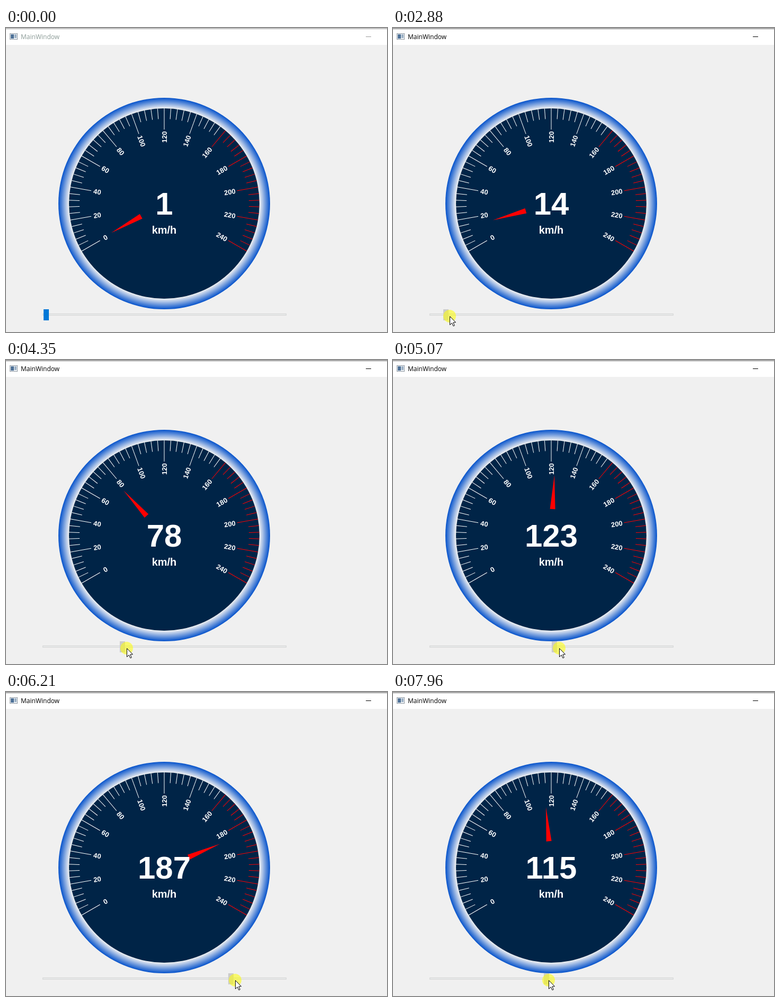
Animation of 720 by 575 pixels, one loop 8 s. Source, as an HTML page with a canvas:

```html
<!DOCTYPE html>
<html lang="en">
<head>
<meta charset="utf-8">
<title>Speedometer</title>
<style>
  html, body { margin: 0; width: 100%; height: 100%; overflow: hidden; background: #f0f0f0; }
  canvas { display: block; }
</style>
</head>
<body>
<canvas id="stage" width="720" height="575"></canvas>
<script>
const ctx = document.getElementById('stage').getContext('2d');
const LOOP = 8000;
const ENTER = 120, HOVER = 960, PRESS = 1710;
const CX = 299, CY = 332, MAX = 240;
const TRACK = { x: 69, y: 540, w: 460, handle: 10 };
const SANS = '"Liberation Sans", Arial, sans-serif';

// Turning points of the drag: time, speed
const DRAG = [
  [2300, 1], [2880, 14], [3660, 41], [4740, 99], [5580, 161],
  [6210, 187], [6660, 213], [6820, 213], [7120, 188], [7960, 115]
];

const clamp = (v, lo, hi) => Math.min(hi, Math.max(lo, v));
const dialAngle = v => (150 + v) * Math.PI / 180;
const handleX = v => TRACK.x + v / MAX * (TRACK.w - TRACK.handle);

function speedAt(t) {
  const time = clamp(t, DRAG[0][0], DRAG[DRAG.length - 1][0]);
  const i = DRAG.findIndex((k, n) => n > 0 && time <= k[0]);
  const [t0, v0] = DRAG[i - 1], [t1, v1] = DRAG[i];
  return v0 + (v1 - v0) * (time - t0) / (t1 - t0);
}

// Glides in on an arc, then holds the handle, slightly ahead of it.
function pointerAt(t) {
  const p = clamp((t - ENTER) / (HOVER - ENTER), 0, 1), rest = 1 - p;
  const grip = handleX(speedAt(t + 35)) + TRACK.handle / 2 + 4;
  return {
    x: Math.round(grip + 395 * rest * rest),
    y: Math.round(545 + 14 * rest - 27 * Math.sin(Math.PI * p))
  };
}

function rect(color, x, y, w, h) {
  ctx.fillStyle = color;
  ctx.fillRect(x, y, w, h);
}

function disc(fill, x, y, r) {
  ctx.fillStyle = fill;
  ctx.beginPath();
  ctx.arc(x, y, r, 0, 7);
  ctx.fill();
}

function polygon(points, fill) {
  ctx.beginPath();
  points.forEach(([x, y]) => ctx.lineTo(x, y));
  ctx.closePath();
  ctx.fillStyle = fill;
  ctx.fill();
}

function text(str, x, y, font, color, align = 'center') {
  ctx.font = font;
  ctx.fillStyle = color;
  ctx.textAlign = align;
  ctx.fillText(str, x, y);
}

// Runs paint with x pointing outwards along the dial at speed v.
function onDial(v, paint) {
  ctx.save();
  ctx.translate(CX, CY);
  ctx.rotate(dialAngle(v));
  paint();
  ctx.restore();
}

function titleBar(active) {
  rect('#fff', 0, 0, 720, 32);
  rect('#ececec', 0, 0, 720, 1);
  rect(active ? '#5c5c5c' : '#969696', 0, 1, 720, 1);
  rect('#8b949e', 7, 10, 15, 12);
  rect('#f4f7fa', 8, 11, 13, 10);
  rect('#4d7096', 9, 12, 6, 8);
  rect('#9bb0c4', 16, 12, 4, 7);
  text('MainWindow', 28, 21, '12px "Open Sans", sans-serif', active ? '#000' : '#8b9a96', 'left');
  rect(active ? '#000' : '#999', 680, 16, 10, 1);
}

function tick(v, length) {
  onDial(v, () => rect(v >= 160 ? '#f00' : '#fff', 180 - length, -0.5, length, 1));
}

function label(v) {
  onDial(v, () => {
    ctx.translate(v < 100 ? 128.5 : 125.8, 0);
    if (v < 120) ctx.rotate(Math.PI);
    text(v, 0, 4.6, 'bold 13px ' + SANS, '#fff');
  });
}

function gauge(speed) {
  const rim = ctx.createRadialGradient(CX, CY, 180, CX, CY, 200);
  rim.addColorStop(0, '#f2f2f2');
  rim.addColorStop(1, '#0552cb');
  disc(rim, CX, CY, 200);
  disc('#002447', CX, CY, 180);
  for (let v = 0; v <= MAX; v += 4) {
    const major = v % 20 === 0;
    tick(v, major ? 40 : 20);
    if (major) label(v);
  }
  onDial(speed, () => polygon([[50, -5], [50, 5], [114.5, 0]], '#f00'));
  text(speed, CX, 353, 'bold 60px ' + SANS, '#fff');
  text('km/h', CX, 389, 'bold 20px ' + SANS, '#fff');
}

function slider(speed, color) {
  rect('#d6d6d6', TRACK.x, TRACK.y, TRACK.w + 1, 4);
  rect('#e7eaea', TRACK.x + 1, TRACK.y + 1, TRACK.w - 1, 2);
  rect(color, Math.round(handleX(speed)), 532, TRACK.handle, 21);
}

function pointer({ x, y }, pressed) {
  if (pressed) disc('rgba(255,255,0,0.55)', x, y, 12);
  ctx.save();
  ctx.translate(x + 0.5, y + 0.5);
  polygon([[0, 0], [0, 16], [3.8, 12.5], [6.5, 18.3], [8.8, 17.3], [6.3, 11.5], [11, 11.3]], '#fff');
  ctx.strokeStyle = '#000';
  ctx.stroke();
  ctx.restore();
}

function draw(t) {
  const speed = Math.round(speedAt(t)), pressed = t >= PRESS;
  rect('#f0f0f0', 0, 0, 720, 575);
  titleBar(pressed);
  gauge(speed);
  slider(speed, pressed ? '#ccc' : t >= HOVER ? '#171717' : '#0078d7');
  if (t >= ENTER) pointer(pointerAt(t), pressed);
}

const start = performance.now();
function loop() {
  draw((performance.now() - start) % LOOP);
  requestAnimationFrame(loop);
}
loop();
</script>
</body>
</html>
```
